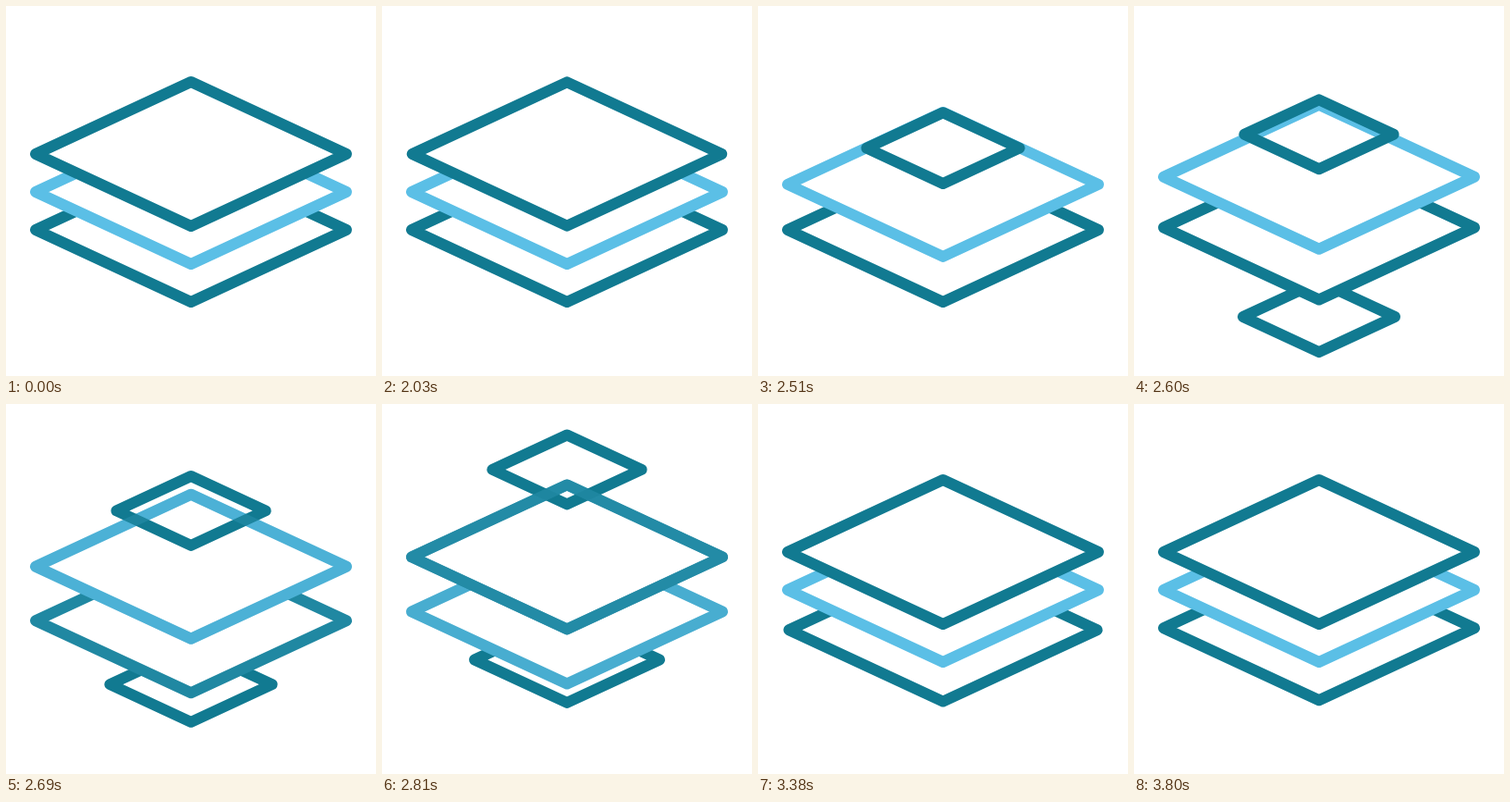
These frames come from a looping animation (400x400 px, 3.83 s). An HTML page with a canvas:

```html
<!DOCTYPE html>
<html lang="en">
<head>
<meta charset="utf-8">
<title>Stacked layers</title>
<style>
  html, body { margin: 0; width: 100%; height: 100%; overflow: hidden; background: #fff; }
  canvas { display: block; width: 400px; height: 400px; }
</style>
</head>
<body>
<canvas id="stage" width="400" height="400"></canvas>
<script>
const ctx = document.getElementById('stage').getContext('2d');
const LOOP = 3830, HOLD = 2000, STEP = 30;
const SWAP = 600; // the outgoing and incoming layers change places here
const GONE = 840;
const TOP = 160, GAP = 41, SMALL = 0.48;
const DARK = [17, 122, 145], LIGHT = [91, 191, 230];

const lerp = (a, b, p) => a + (b - a) * p;
const clamp = p => Math.min(1, Math.max(0, p));
const ease = (t, start, length) => {
  const p = clamp((t - start) / length);
  return p * p * (3 - 2 * p);
};
const mix = (a, b, p) => `rgb(${a.map((v, i) => Math.round(lerp(v, b[i], p)))})`;

function layer(y, scale, color, fill = 1, alpha = 1) {
  const w = 168 * scale, h = 78 * scale;
  ctx.beginPath();
  ctx.moveTo(200 - w, y);
  ctx.lineTo(200, y - h);
  ctx.lineTo(200 + w, y);
  ctx.lineTo(200, y + h);
  ctx.closePath();
  ctx.fillStyle = `rgba(255,255,255,${fill})`;
  ctx.fill();
  ctx.globalAlpha = alpha;
  ctx.strokeStyle = color;
  ctx.stroke();
  ctx.globalAlpha = 1;
}

function draw(t) {
  ctx.fillStyle = '#fff';
  ctx.fillRect(0, 0, 400, 400);
  ctx.lineWidth = 12;
  ctx.lineJoin = 'round';

  const tint = ease(t, SWAP, 315);
  const upperY = TOP + GAP * (1 - ease(t, 335, 615));
  const lowerY = TOP + GAP * (2 - ease(t, 495, 700));
  const upperColor = mix(LIGHT, DARK, tint);

  if (t >= SWAP) {
    const y = TOP + 2 * GAP + 94 * Math.exp(-0.00478 * (t - SWAP));
    layer(y, lerp(SMALL, 1, ease(t, 530, 920)), mix(DARK, DARK, 0));
  }
  layer(lowerY, 1, mix(DARK, LIGHT, tint));
  layer(upperY, 1, upperColor);

  if (t < GONE) {
    const y = TOP - 0.00053 * Math.max(0, t - 400) ** 2;
    const fill = 1 - clamp((t - 510) / 90);
    layer(y, lerp(1, SMALL, ease(t, 0, 560)), mix(DARK, DARK, 0), fill);
    // the rising layer gradually passes in front of the leaving one
    if (tint > 0) layer(upperY, 1, upperColor, 0, tint);
  }
}

const origin = performance.now();
function tick() {
  const t = (performance.now() - origin) % LOOP - HOLD;
  draw(Math.max(0, Math.floor(t / STEP) * STEP));
  requestAnimationFrame(tick);
}
tick();
</script>
</body>
</html>
```
